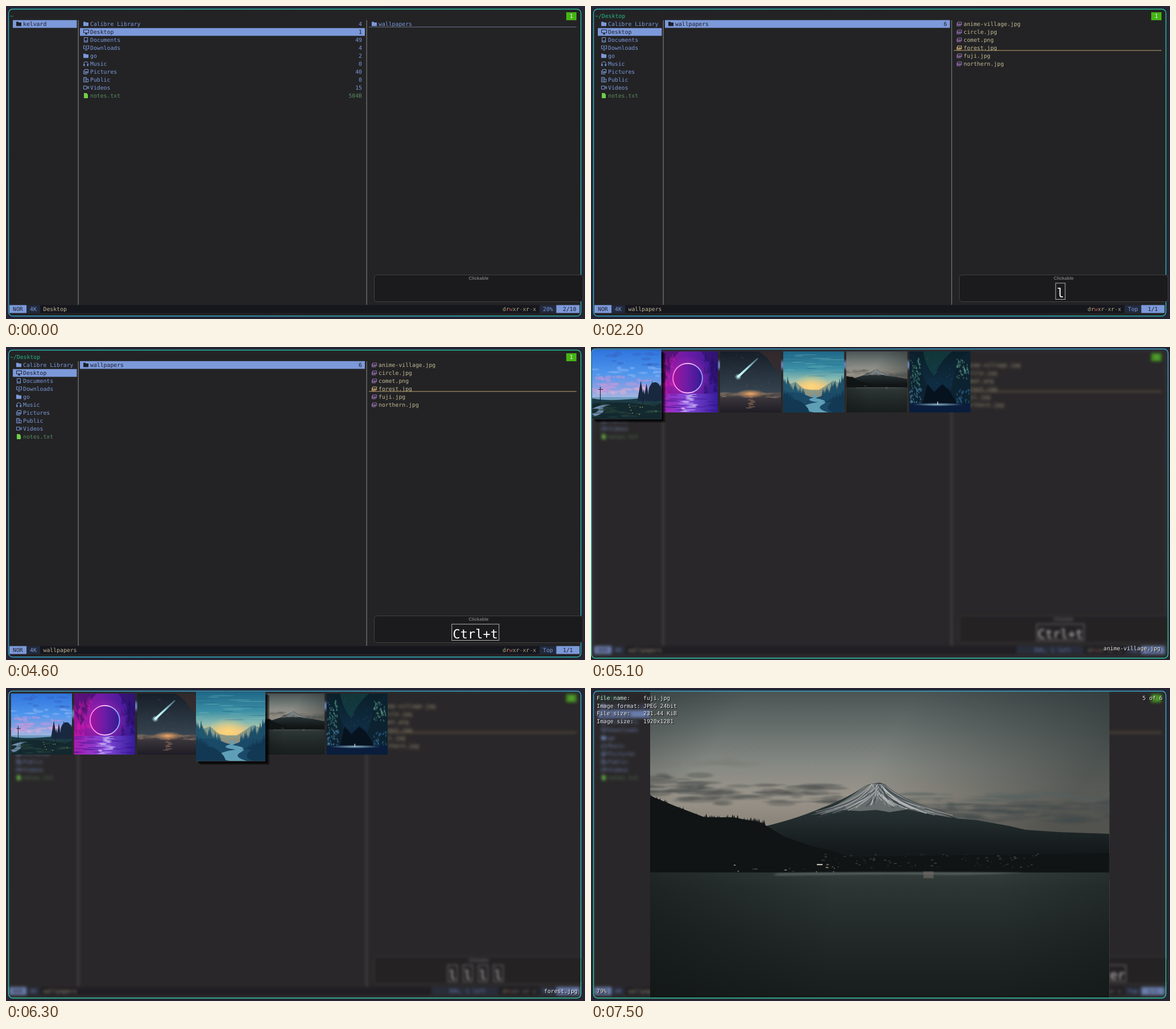
Animation, 1018 px wide and 550 px high, one loop 8000 ms. Source, as an HTML page:

```html
<!DOCTYPE html>
<html lang="en">
<head>
<meta charset="utf-8">
<title>File manager</title>
<style>
  html, body { margin: 0; width: 100%; height: 100%; overflow: hidden; background: #252535; }
  svg { display: block; }
  text { font: 9.8px "DejaVu Sans Mono", "Noto Sans Mono", monospace; text-rendering: geometricPrecision; white-space: pre; }
  .key { font-size: 22px; fill: #fff; }
  .label { font: bold 8px "Liberation Sans", Arial, sans-serif; fill: #77777a; }
  .hide { display: none; }
</style>
</head>
<body>
<svg id="stage" width="1018" height="550" viewBox="0 0 1018 550"></svg>
<script>
const LOOP = 8000, OPEN = 4640, OPEN_LEN = 700;
const WIN = { x: 4.5, y: 5.5, w: 1006.3, h: 539.2 };
const BLUE = '#7c99da', INK = '#1e1f28', TAN = '#c2b995', GREEN = '#5a8a60';

const rect = (x, y, w, h, fill, more = '') =>
  `<rect x="${x}" y="${y}" width="${w}" height="${h}" fill="${fill}" ${more}/>`;
const path = (d, fill, more = '') => `<path d="${d}" fill="${fill}" ${more}/>`;
const text = (x, y, s, fill, more = '') => `<text x="${x}" y="${y}" fill="${fill}" ${more}>${s}</text>`;
const END = 'text-anchor="end"';
const shaded = (x, y, s, more = '') => text(x + 1, y + 1, s, '#000', more) + text(x, y, s, '#eee', more);
const gradient = (id, stops, dir = 'x2="0" y2="1"') =>
  `<linearGradient id="${id}" ${dir}>` +
  stops.map(([at, c, o = 1]) => `<stop offset="${at}" stop-color="${c}" stop-opacity="${o}"/>`).join('') +
  '</linearGradient>';
const glow = (id, color) =>
  `<radialGradient id="${id}"><stop offset="0" stop-color="${color}"/><stop offset="1" stop-color="${color}" stop-opacity="0"/></radialGradient>`;
const oval = (x, y, rx, ry, fill, more = '') => `<ellipse cx="${x}" cy="${y}" rx="${rx}" ry="${ry}" fill="${fill}" ${more}/>`;

function random(seed) {
  return () => (seed = (seed * 16807) % 2147483647) / 2147483647;
}
const repeat = (n, f) => Array.from({ length: n }, (_, i) => f(i)).join('');

// Icons: outline, then filled part
const ICONS = {
  folder: ['', 'M0 .8h3.6l1 1.3H9v6.2H0z'],
  desk: ['M.5 .8h9v5.4h-9zM3 8.6h4', 'M4 6h2v2.6H4z'],
  doc: ['M1.5 .5h6v8h-6zM1.5 6.3h6', ''],
  down: ['M3 .8H.5v5.4h9V.8H7M3 8.6h4M5 0v4M3.4 2.8L5 4.4l1.6-1.6', ''],
  music: ['M.8 7V4.6a3.7 3.7 0 0 1 7.4 0V7', 'M.3 5h2.2v3.6H.3zM6.5 5h2.2v3.6H6.5z'],
  pic: ['M2.2 .5h6.3v5.8H2.2zM.6 2.3v6.2H7', 'M3 5.6l2-2.4 1.2 1.2.8-.8 1 2z'],
  pub: ['M.5 .5h5v8h-5zM5.5 3.5h3.2v5H5.5M2 2.5h2M2 4.5h2M2 6.5h2', ''],
  vid: ['M.5 1.6h5.6v5.6H.5zM6.1 4.4l3.2-2v4z', ''],
  file: ['', 'M1 0h4.6L8 2.4V9H1z'],
  image: ['M1.6 1.2h7v5h-7zM.5 3v5h6.5', 'M2.4 5.6l2-2.2 1.3 1 1-.8 1.4 2z']
};
const icon = (name, x, y, color) => `<g transform="translate(${x} ${y})">` +
  path(ICONS[name][0], 'none', `stroke="${color}"`) + path(ICONS[name][1], color) + '</g>';

const HOME = [
  ['folder', 'Calibre Library', 4], ['desk', 'Desktop', 1], ['doc', 'Documents', 49],
  ['down', 'Downloads', 4], ['folder', 'go', 2], ['music', 'Music', 0], ['pic', 'Pictures', 40],
  ['pub', 'Public', 0], ['vid', 'Videos', 15], ['file', 'notes.txt', '504B']
];
const WALLS = ['anime-village.jpg', 'circle.jpg', 'comet.png', 'forest.jpg', 'fuji.jpg', 'northern.jpg'];

function list(x, items, selected, width, counts) {
  return items.map(([kind, name, count], i) => {
    const y = 25 + 14 * i, on = i === selected, plain = kind === 'file';
    const color = on ? INK : plain ? GREEN : BLUE;
    return (on ? rect(x - 6, y - .2, width, 13.6, BLUE) : '') +
      icon(kind, x, y + 2, plain ? '#6fce4b' : color) +
      text(x + 12, y + 10.3, name, color) +
      (counts ? text(626, y + 10.3, count, color, END) : '');
  }).join('');
}
const WALL_DIR = [['folder', 'wallpapers', 6]];

const homePane = text(7, 21, '~', '#25b685') +
  list(18, [['folder', 'kelvard']], 0, 112.5) +
  list(136, HOME, 1, 501, true) + list(643, WALL_DIR) + rect(638, 36.3, 365, 1.2, '#62687a');

const deskPane = text(7, 21, '~/Desktop', '#25b685') +
  list(18, HOME, 1, 112.5) + list(136, WALL_DIR, 0, 501, true) +
  WALLS.map((name, i) => icon('image', 643, 27 + 14 * i, i === 3 ? '#d8b077' : '#9a72b4') +
    text(655, 35.3 + 14 * i, name, TAN)).join('') + rect(638, 77.5, 365, 1.2, '#a48f63');

const perms = [...'drwxr-xr-x'].map(c =>
  `<tspan fill="${{ d: '#a3b07a', r: '#cdb685', w: '#c9505c', x: '#9cab86', '-': '#777' }[c]}">${c}</tspan>`).join('');
const status = (name, percent, place) => rect(6, 525.5, 1002.5, 14, '#16161d') +
  rect(6, 525.5, 30, 14, BLUE) + text(12, 536, 'NOR', INK) +
  rect(36, 525.5, 24, 14, '#222a3c') + text(42, 536, '4K', BLUE) + text(65.5, 536, name, TAN) +
  text(873, 536, perms, TAN, 'font-weight="bold"') +
  rect(938, 525.5, 29.5, 14, '#222a3c') + text(944, 536, percent, BLUE) +
  rect(967.5, 525.5, 41, 14, BLUE) + text(979, 536, place, INK);

// Pictures
const tree = (x, base, h, slim = .17) => `M${x - h * slim} ${base}L${x} ${base - h}L${x + h * slim} ${base}z`;
function stars(n, seed, w, h) {
  const r = random(seed);
  return repeat(n, () => rect(r() * w, r() * h, .7, .7, '#cfe4ee', `opacity="${.2 + r() * .5}"`));
}

function village() {
  const r = random(41);
  const puffs = (n, x, y, w, h, color) => repeat(n, () =>
    oval(x + r() * w, y + r() * h, 2 + r() * 8, 1 + r() * 2, color, 'opacity=".45"'));
  return rect(0, 0, 108, 108, 'url(#daySky)') +
    puffs(14, 30, 0, 78, 24, '#3565c4') + puffs(16, 0, 28, 108, 16, '#8fb8f5') +
    puffs(34, 0, 42, 100, 22, '#cf98d8') + puffs(12, 10, 60, 70, 8, '#e3b4d4') +
    rect(0, 74, 108, 6, '#6f9cc0') +
    path('M0 76Q20 80 48 78T108 74V108H0z', '#1c3a44') +
    path('M0 84Q30 80 70 84T108 82V108H0z', '#14282f') +
    path('M0 92Q16 84 30 86Q14 88 18 93Q20 99 4 104L0 100Q12 96 10 92z', '#6f8db0') +
    repeat(30, () => oval(r() * 108, 82 + r() * 24, 4 + r() * 8, 1, '#2a4a3e', 'opacity=".5"')) +
    path(repeat(8, i => tree(76 + i * 4.4, 80, 14 + r() * 18)), '#18283f') +
    oval(98, 66, 10, 15, '#18283f') +
    path('M13 58v24M10 62h7M79 72v14', 'none', 'stroke="#15233a"') +
    repeat(8, () => rect(56 + r() * 48, 84 + r() * 20, 1.2, 1.2, '#c6cf60'));
}
function ring() {
  const r = random(7);
  return rect(0, 0, 108, 108, 'url(#neon)') +
    path('M0 0H40L28 14 22 40 12 56 0 30zM108 0H78L92 20 96 50 108 64z', '#2a0f5c', 'opacity=".55"') +
    repeat(22, () => path(`M${r() * 30} ${r() * 70}l${8 - r() * 6} 14l-8 -3z`, '#e01cab', 'opacity=".35"')) +
    repeat(16, () => path(`M${82 + r() * 24} ${r() * 66}l5 12l-7 2z`, '#1d0f66', 'opacity=".45"')) +
    oval(54.5, 47.5, 42, 40, 'url(#pinkGlow)', 'opacity=".6"') +
    oval(54.5, 47.5, 26, 26, 'url(#neon)', 'stroke="url(#neonRing)" stroke-width="1.8"') +
    rect(0, 75, 108, 33, 'url(#neonSea)') +
    repeat(24, () => oval(r() * 108, 77 + r() * 30, 5 + r() * 12, .9, '#3d118e', 'opacity=".5"')) +
    repeat(26, i => oval(56 + (r() - .5) * 22, 76 + i * 1.2, 3 + r() * 8, .7, '#e4dcff', 'opacity=".6"'));
}
function comet() {
  const r = random(19);
  return rect(0, 0, 108, 108, 'url(#night)') + stars(35, 5, 108, 66) +
    path('M68 0L84 12 96 30 108 38V0z', '#3a2c2c', 'opacity=".75"') +
    path('M30 44L66 11.5 68 13 33 47z', 'url(#tail)') + oval(32, 45, 6, 6, 'url(#coldGlow)') +
    rect(0, 73, 108, 35, 'url(#dusk)') + oval(54, 75, 26, 8, 'url(#warmGlow)') +
    repeat(26, () => oval(r() * 108, 73 + r() * 9, 3 + r() * 7, 1, '#8b7868', 'opacity=".4"')) +
    repeat(11, i => oval(54 + (r() - .5) * 8, 80 + i * 2, 1 + r() * 5, .7, '#dd9d70', 'opacity=".5"'));
}
function forest() {
  const r = random(23);
  const side = (from, dir, base, tall, color) => path(repeat(20, i =>
    tree(from + dir * i * 2, base, (tall - i * 1.3) * (.6 + r() * .5), .13)), color);
  return rect(0, 0, 108, 108, 'url(#dawn)') +
    repeat(20, i => oval(r() * 108, 4 + i * 2.2, 8 + r() * 20, .7, i % 3 ? '#7fc0c4' : '#1b5f80', 'opacity=".4"')) +
    oval(50, 62, 34, 22, 'url(#sunGlow)') +
    path('M0 62L22 54 36 66 48 68 64 68 88 52 108 58V84H0z', '#4a7f8a', 'opacity=".6"') +
    side(0, 1, 82, 40, '#21566f') + side(108, -1, 82, 42, '#1c4e69') +
    path('M0 74Q26 70 42 78T72 76Q94 70 108 76V108H0z', '#1a4a68') +
    path('M48 76Q62 79 50 83T62 90Q40 93 36 98T54 108H80Q56 101 70 94T57 83Q66 79 54 76z', '#5f9fb6') +
    side(0, 1, 90, 24, '#123a55') + side(108, -1, 90, 26, '#113751') +
    path('M0 86Q22 82 34 91T46 108H0zM108 86Q84 88 80 96T90 108H108z', '#123853');
}
function northern() {
  const r = random(31);
  const rocks = (n, x, y, w, h, color) => repeat(n, () => {
    const px = x + r() * w, py = y + r() * h;
    return path(`M${px} ${py}l${1 + r() * 3} ${2 + r() * 4}l-3 1z`, color, 'opacity=".5"');
  });
  return rect(0, 0, 108, 108, 'url(#polar)') + path('M24 0H76Q52 20 44 44Q28 26 24 0z', '#1c5852', 'opacity=".4"') +
    stars(24, 9, 108, 60) +
    path('M0 2Q18 10 22 36L34 70 30 92H0zM108 0Q84 10 80 42L72 72 78 92H108z', '#0d2230') +
    rocks(60, 2, 10, 17, 50, '#478c7c') + rocks(46, 83, 12, 20, 34, '#5a9a84') +
    rocks(36, 0, 62, 22, 28, '#4c8fb8') + rocks(30, 82, 62, 24, 28, '#2e6c98') +
    path('M24 92L32 58 44 72 58 58 70 68 84 92z', '#07121f') +
    rect(0, 92, 108, 16, '#0a1d3d') + oval(50, 94, 46, 3, 'url(#coldGlow)', 'opacity=".7"') + rect(49.4, 89, 1.2, 5, '#e7f5ff');
}
function mountain() {
  const r = random(77);
  const cloud = (x, y, w, h, n, color) => repeat(n, () =>
    oval(x + r() * w, y + r() * h, 6 + r() * 34, 1 + r() * 4, color, 'opacity=".32"'));
  const streak = () => {
    const x = 389 + r() * 22, dx = -112 + r() * 236, dy = 24 + r() * 12 + Math.abs(dx) * .2;
    return path(`M${x} 163q${dx * .32} ${dy * .65} ${dx} ${dy}`, 'none',
      `stroke="${r() < .55 ? '#b9bbb9' : '#39434a'}" stroke-width="${.7 + r() * 1.5}" opacity="${.3 + r() * .5}"`);
  };
  return rect(0, 0, 807, 538, 'url(#greySky)') + rect(0, 0, 807, 330, 'url(#rightShade)') +
    '<g filter="url(#soft)">' + cloud(-20, 146, 110, 34, 26, '#3c4142') + cloud(60, 164, 280, 34, 60, '#4a4d4b') +
    cloud(20, 118, 140, 14, 8, '#7b7a74') + cloud(450, 176, 380, 16, 30, '#566060') +
    cloud(470, 194, 360, 34, 70, '#3f4a4c') + '</g>' +
    path('M180 242Q255 225 300 205Q345 188 374 168Q382 163 391 162L403 160L413 163Q432 182 470 197Q507 214 540 223L574 226L630 236 660 243 720 247 807 250V322H180z', 'url(#slope)') +
    path('M282 217Q330 204 374 168Q390 160 413 163Q434 184 472 199L532 222 486 214 452 207 420 212 398 208 368 210 338 208z', '#8f9492', 'opacity=".6"') +
    repeat(110, streak) +
    path('M0 183L46 202 96 221 146 221 196 231 236 255 282 271 320 280 350 290 807 284V330H0z', '#101415') +
    path(repeat(70, i => tree(i * 2.9, 190 + Math.min(i * 1.2, 36) + Math.max(0, i - 50) * .5, 4 + r() * 8, .25)), '#101415') +
    path('M0 318H807V538H0z', 'url(#lake)') + rect(0, 318, 807, 220, 'url(#waterShade)') +
    '<g filter="url(#soft)">' + path('M220 319Q430 315 660 318Q560 324 500 322T220 324z', '#65706d', 'opacity=".55"') + '</g>' +
    repeat(110, () => rect(300 + r() * 380, 284 + r() * 24, 1 + r() * 4, 1 + r(), '#a3a09a', `opacity="${r() * .4}"`)) +
    repeat(16, () => rect(106 + r() * 320, 303 + r() * 13, 2 + r() * 3, 1.5, '#e2d8c8', `opacity="${r() * .8}"`)) +
    rect(293, 303, 10, 2, '#e0d8ca') + rect(480, 316, 18, 12, '#756b66', 'opacity=".6"');
}

const symbol = (id, body, box = '0 0 108 108') =>
  `<symbol id="${id}" viewBox="${box}" preserveAspectRatio="xMidYMid slice">${body}</symbol>`;
const defs = '<defs>' +
  gradient('edge', [[0, '#22c495'], [1, '#35a9d0']], 'x1="1" y1="0" x2="0" y2="1"') +
  gradient('popLine', [[0, '#3aa9cc'], [1, '#2fcb9c']]) +
  gradient('daySky', [[0, '#2f74de'], [.35, '#4f96ec'], [.58, '#8fa2e2'], [.74, '#a9bfe2']]) +
  gradient('neon', [[0, '#a2149c'], [.5, '#6b1ca6'], [1, '#351a92']], '') +
  gradient('neonRing', [[0, '#ff7be6'], [.55, '#ffd3ff'], [1, '#86a5ff']], '') +
  gradient('neonSea', [[0, '#a91cae'], [.5, '#8448da'], [1, '#351c9b']], '') +
  gradient('night', [[0, '#161e28'], [.66, '#35434f']]) +
  gradient('tail', [[0, '#e4ffff'], [.5, '#9edfe4'], [1, '#6fb3bd', .4]], 'x1="0" y1="1" x2="1" y2="0"') +
  gradient('dusk', [[0, '#5a5351'], [.3, '#39343a'], [1, '#1e1c25']]) +
  gradient('dawn', [[0, '#1f6687'], [.28, '#3b8fa5'], [.46, '#8dbcb2'], [.58, '#e8c384'], [.68, '#ee9f78']]) +
  gradient('polar', [[0, '#0a1e28'], [.55, '#0f2c42'], [1, '#0a1a33']]) +
  gradient('greySky', [[0, '#4b5453'], [.12, '#676f6d'], [.24, '#868983'], [.34, '#9a958b'], [.42, '#8d867c']]) +
  gradient('rightShade', [[0, '#182021', .3], [.2, '#182021', 0], [.55, '#182021', 0], [1, '#182021', .5]], 'y2=".25"') +
  gradient('waterShade', [[0, '#0e1212', .5], [.4, '#0e1212', 0], [.75, '#0e1212', 0], [1, '#0e1212', .3]], '') +
  gradient('slope', [[0, '#333d40'], [.4, '#232c2e'], [.75, '#14191a']]) +
  gradient('lake', [[0, '#333c3a'], [.12, '#2c3533'], [.5, '#222928'], [1, '#181d1d']]) +
  glow('pinkGlow', '#e332c8') + glow('coldGlow', '#c3f3ff') + glow('warmGlow', '#f0a667') + glow('sunGlow', '#ffd579') +
  symbol('pic0', village()) + symbol('pic1', ring()) + symbol('pic2', comet()) + symbol('pic3', forest()) +
  symbol('pic4', mountain(), '0 0 807 538') + symbol('pic5', northern()) +
  '<filter id="soft"><feGaussianBlur stdDeviation="3 1"/></filter>' +
  '<filter id="blur" filterUnits="userSpaceOnUse" x="0" y="0" width="1018" height="550" color-interpolation-filters="sRGB"><feGaussianBlur stdDeviation="2.4"/></filter>' +
  '<clipPath id="clip"><rect id="clipBox" rx="7"/></clipPath></defs>';

const frame = (id, line) => `<rect id="${id}" x="${WIN.x}" y="${WIN.y}" width="${WIN.w}" height="${WIN.h}" rx="7" fill="none" stroke="${line}" stroke-width="1.4"/>`;

const main = '<g id="main">' + rect(0, 0, 1018, 550, '#252535') +
  rect(WIN.x, WIN.y, WIN.w, WIN.h, '#232325', 'rx="7"') +
  frame('mainEdge', 'url(#edge)') + frame('idleEdge', '#3a3a40') +
  rect(126.4, 25, 1.5, 500, '#6b6b6d') + rect(633.4, 25, 1.5, 500, '#6b6b6d') +
  rect(985, 11, 18, 14, '#45b414') + text(991, 21.3, '1', '#e8f4e0') +
  `<g id="home">${homePane}${status('Desktop', '20%', '2/10')}</g>` +
  `<g id="desk">${deskPane}${status('wallpapers', 'Top', '1/1')}</g>` +
  `<g id="task">${rect(748, 525.5, 118, 14, '#222a3c')}${text(779, 536, '99%, 1 left', BLUE)}</g>` +
  rect(647.5, 472.5, 367, 47, '#1b1b1d', 'rx="5" stroke="#414143"') +
  text(831, 480.5, 'Clickable', '#77777a', 'class="label" text-anchor="middle"') + '<g id="keys"></g></g>';

const photo = '<use href="#pic4" x="104" y="6" width="807.5" height="538.5"/>' +
  [['File name:', 'fuji.jpg'], ['Image format:', 'JPEG 24bit'], ['File size:', '231.44 KiB'], ['Image size:', '1920x1281']]
    .map(([k, v], i) => shaded(10, 21.3 + 13.4 * i, k) + shaded(92, 21.3 + 13.4 * i, v)).join('') +
  shaded(1005, 21.3, '5 of 6', END) + shaded(10, 535.5, '79%');

const stage = document.getElementById('stage');
stage.innerHTML = defs + main +
  `<g id="popup"><g clip-path="url(#clip)"><use href="#main" filter="url(#blur)"/>` +
  rect(0, 0, 1018, 550, '#393435', 'opacity=".28"') +
  `<g id="view"><g id="thumbs"></g><g id="photo">${photo}</g></g></g>${frame('popEdge', 'url(#popLine)')}</g>`;
const el = id => document.getElementById(id);
const show = (id, on) => el(id).classList.toggle('hide', !on);
const set = (id, attrs) => { for (const k in attrs) el(id).setAttribute(k, attrs[k]); };

function drawThumbs(sel) {
  const tile = i => `<use href="#pic${i}" x="${8.5 + 111 * i}" y="9.5" width="107.5" height="107.5"/>`;
  const x = Math.max(5.5, 1 + 111 * sel), y = 6.5, size = 122;
  el('thumbs').innerHTML = WALLS.map((_, i) => i === sel ? '' : tile(i)).join('') +
    rect(x + 7, y + 6, size, size, '#000', 'opacity=".45"') +
    rect(x + 4, y + 4, size, size, '#000', 'opacity=".65"') +
    `<use href="#pic${sel}" x="${x}" y="${y}" width="${size}" height="${size}"/>` +
    shaded(1005, 535.5, WALLS[sel], END);
}

function drawKeys(keys) {
  const widths = keys.map(k => k.length * 13.25 + 3.5), gap = 10;
  let x = 825.3 - (widths.reduce((a, b) => a + b, 0) + gap * (keys.length - 1)) / 2;
  el('keys').innerHTML = keys.map((k, i) => {
    const box = rect(x, 487, widths[i], 28.5, 'none', 'stroke="#b4b4b4"') + text(x + 1.75, 512, k, '#fff', 'class="key"');
    x += widths[i] + gap;
    return box;
  }).join('');
}

// Value of the last entry whose time has come
const at = (track, t) => track.reduce((v, [time, next]) => t >= time ? next : v, track[0][1]);
const KEYS = [[0, ''], [2200, 'l'], [3200, ''], [4600, 'Ctrl+t'], [5600, 'l'], [5800, 'l l'], [6100, 'l l l'],
  [6300, 'l l l l'], [6500, 'l l l l l'], [6700, 'l l l l l h'], [7300, 'l l l l l h Enter']];
const SELECTED = [[0, 0], [5700, 1], [5900, 2], [6100, 3], [6400, 4], [6500, 5], [6800, 4]];

function overshoot(x) {
  if (x >= 1) return 1;
  const curve = (s, a, b) => 3 * (1 - s) ** 2 * s * a + 3 * (1 - s) * s * s * b + s ** 3;
  let lo = 0, hi = 1;
  for (let i = 0; i < 30; i++) {
    const mid = (lo + hi) / 2;
    if (curve(mid, .05, .1) < x) lo = mid; else hi = mid;
  }
  return curve(lo, .9, 1.05);
}

function placePopup(t) {
  const k = overshoot((t - OPEN) / OPEN_LEN);
  const box = { width: WIN.w * k, height: WIN.h * k };
  box.x = WIN.x + (WIN.w - box.width) / 2;
  box.y = WIN.y + (WIN.h - box.height) / 2;
  set('clipBox', box);
  set('popEdge', box);
  set('view', { transform: `translate(${box.x} ${box.y}) scale(${Math.min(k, 1)}) translate(${-WIN.x} ${-WIN.y})` });
  set('popup', { opacity: Math.min(1, (t - OPEN) / 250) });
}

let last = {};
function update(t) {
  const now = { keys: at(KEYS, t), sel: at(SELECTED, t), desk: t >= 2200, popup: t > OPEN, photo: t >= 7400 };
  const changed = k => now[k] !== last[k];
  if (changed('keys')) drawKeys(now.keys ? now.keys.split(' ') : []);
  if (changed('sel')) drawThumbs(now.sel);
  if (changed('desk')) { show('home', !now.desk); show('desk', now.desk); }
  if (changed('popup')) {
    for (const id of ['popup', 'task', 'idleEdge']) show(id, now.popup);
    show('mainEdge', !now.popup);
  }
  if (changed('photo')) { show('photo', now.photo); show('thumbs', !now.photo); }
  if (now.popup && (changed('popup') || last.moving)) placePopup(t);
  last = now;
  last.moving = now.popup && t < OPEN + OPEN_LEN;
}

const start = performance.now();
function tick() {
  update((performance.now() - start) % LOOP);
  requestAnimationFrame(tick);
}
tick();
</script>
</body>
</html>
```
